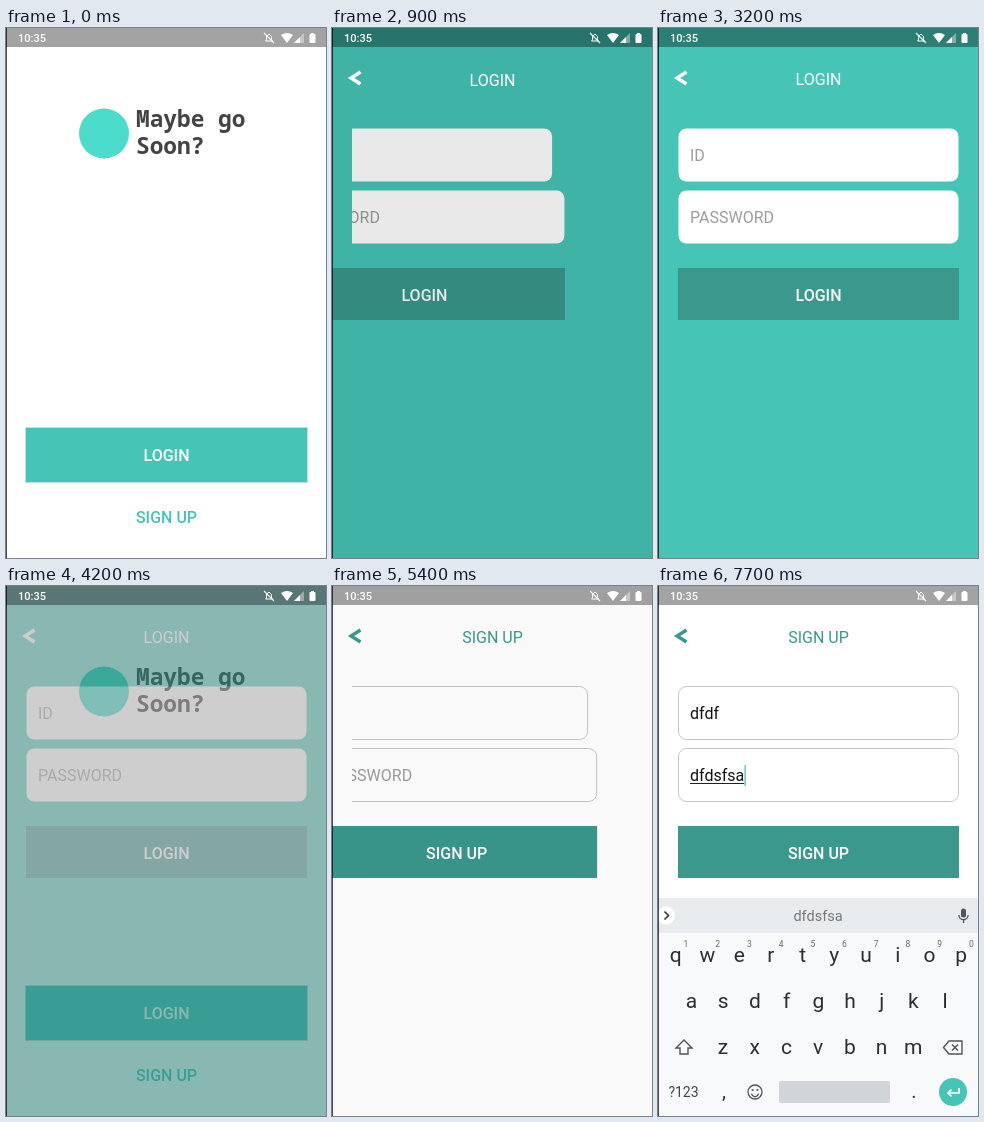
An HTML page with a canvas for the animation above (8 s loop, 320 by 530 pixels).

```html
<!DOCTYPE html>
<html lang="en">
<head>
<meta charset="utf-8">
<title>Login flow</title>
<style>
html, body { margin: 0; width: 100%; height: 100%; overflow: hidden; background: #fff; }
canvas { display: block; width: 100vw; height: 100vh; }
</style>
</head>
<body>
<canvas id="stage"></canvas>
<script>
const W = 320, H = 530, LOOP = 8000;
const TEAL = '#46c4b6', DEEP = '#3a988d', SANS = 'Roboto, sans-serif';
const LOGIN = { title: 'LOGIN', titleFrom: 432.5, bg: TEAL, ink: '#fff' };
const SIGN_UP = { title: 'SIGN UP', titleFrom: 494.5, bg: '#fff', ink: DEEP, border: '#c6c6c6' };
const scale = Math.max(1, window.devicePixelRatio || 1);

function makeContext(canvas) {
  canvas.width = W * scale;
  canvas.height = H * scale;
  const ctx = canvas.getContext('2d');
  ctx.scale(scale, scale);
  return ctx;
}

const screen = makeContext(document.getElementById('stage'));
const layer = makeContext(document.createElement('canvas'));
let g = screen;

const clamp = v => Math.min(1, Math.max(0, v));
const progress = (t, start, length) => clamp((t - start) / length);
const easeOut = u => 1 - (1 - u) ** 2;
const easeInOut = u => u * u * (3 - 2 * u);

function rect(x, y, w, h, color) {
  g.fillStyle = color;
  g.fillRect(x, y, w, h);
}

function box(x, y, w, h, r, fill, stroke) {
  g.beginPath();
  g.roundRect(x, y, w, h, r);
  g.fillStyle = fill;
  g.fill();
  if (stroke) {
    g.strokeStyle = stroke;
    g.lineWidth = 1;
    g.stroke();
  }
}

function disc(x, y, r, color) {
  g.fillStyle = color;
  g.beginPath();
  g.arc(x, y, r, 0, Math.PI * 2);
  g.fill();
}

function trace(points) {
  g.beginPath();
  for (let i = 0; i < points.length; i += 2) g.lineTo(points[i], points[i + 1]);
}

function poly(points, color) {
  trace(points);
  g.fillStyle = color;
  g.fill();
}

function line(points, color, width, closed = false) {
  trace(points);
  if (closed) g.closePath();
  g.strokeStyle = color;
  g.lineWidth = width;
  g.stroke();
}

function text(str, x, y, size, color, align = 'center', weight = 400, family = SANS) {
  g.font = `${weight} ${size}px ${family}`;
  g.textAlign = align;
  g.fillStyle = color;
  g.fillText(str, x, y);
}

function statusBar() {
  rect(0, 0, W, 19, 'rgba(0,0,0,.36)');
  text('10:35', 12, 14, 11, '#fff', 'left', 500);
  // muted bell
  line([259.5, 13, 260.5, 12, 260.5, 8.5, 263, 6, 265.5, 8.5, 265.5, 12, 266.5, 13], '#fff', 1, true);
  line([258, 5, 268, 15], '#fff', 1.1);
  // wifi
  g.beginPath();
  g.moveTo(281, 15);
  g.lineTo(275, 7);
  g.quadraticCurveTo(281, 3, 287, 7);
  g.fillStyle = '#fff';
  g.fill();
  // signal
  poly([288, 15, 298, 15, 298, 5], 'rgba(255,255,255,.4)');
  poly([288, 15, 294, 15, 294, 9], '#fff');
  // battery
  rect(305, 5, 3, 1, '#fff');
  box(303.5, 6, 6, 9, 1, '#fff');
}

function loginButton(hidden) {
  rect(20, 400, 281, 54, TEAL);
  g.strokeStyle = 'rgba(50,150,138,.3)';
  g.lineWidth = 1;
  g.strokeRect(19.5, 399.5, 282, 55);
  if (hidden !== LOGIN.title) text(LOGIN.title, 160.5, LOGIN.titleFrom, 16, '#fff', 'center', 500);
}

// hidden names the label that has left to become a page heading.
function welcome(hidden) {
  rect(0, 0, W, H, '#fff');
  disc(98, 105.5, 25, '#4bdccb');
  const mono = '"Noto Sans Mono", "DejaVu Sans Mono", monospace';
  text('Maybe go', 130, 98.5, 22.8, '#444', 'left', 600, mono);
  text('Soon?', 130, 126, 22.8, '#444', 'left', 600, mono);
  loginButton(hidden);
  if (hidden !== SIGN_UP.title) text(SIGN_UP.title, 160.5, SIGN_UP.titleFrom, 16, TEAL, 'center', 500);
}

function field(y, dx, hint, border, input) {
  g.save();
  g.beginPath();
  g.rect(20, y - 1, 300, 56);
  g.clip();
  box(20.5 + dx, y + .5, 280, 53, 8, '#fff', border);
  if (input && input.value) {
    text(input.value, 32, y + 33, 16, '#111', 'left');
  } else {
    text(hint, 32 + dx, y + 33, 16, '#9d9d9d', 'left');
  }
  if (input && input.focus) {
    g.font = `400 16px ${SANS}`;
    const w = g.measureText(input.value).width;
    if (w) rect(32, y + 35, w, 1, '#222');
    rect(32.3 + w, y + 17, 1.3, 21, TEAL);
  }
  g.restore();
}

// s is the time since the parts began sliding in.
function form(page, s, id, password) {
  const slide = delay => -327 * (1 - easeOut(progress(s, delay, 480)));
  const dx = slide(0);
  rect(0, 0, W, H, page.bg);
  field(100, slide(19), 'ID', page.border, id);
  field(162, dx, 'PASSWORD', page.border, password);
  rect(20 + dx, 240, 281, 52, DEEP);
  text(page.title, 160.5 + dx, 272.5, 16, '#fff', 'center', 500);
}

function heading(page, s) {
  const y = page.titleFrom + (56.5 - page.titleFrom) * easeInOut(progress(s, 0, 270));
  text(page.title, 160.5, y, 16, page.ink);
  g.globalAlpha = progress(s, 30, 200);
  line([28.5, 44, 19, 50, 28.5, 56], page.ink, 3.4);
  g.globalAlpha = 1;
}

function typed(t, steps) {
  let value = '';
  for (const [at, str] of steps) if (t >= at) value = str;
  return value;
}

const idSteps = [[6500, 'd'], [6600, 'df'], [6700, 'dfd'], [6800, 'dfdf']];
const passSteps = [[7200, 'd'], [7500, 'dfd'], [7600, 'dfdsf'], [7700, 'dfdsfsa']];

function signUp(t, s) {
  const id = { value: typed(t, idSteps), focus: t >= 6200 && t < 7100 };
  const password = { value: typed(t, passSteps), focus: t >= 7100 };
  form(SIGN_UP, s, id, password);
  if (t >= 6200) keyboard(218 * (1 - easeOut(progress(t, 6150, 300))), (id.focus ? id : password).value);
}

function keyRow(keys, x, y) {
  [...keys].forEach((k, i) => text(k, x + i * 31.7, y, 21, '#2b2f33'));
}

function keyboard(dy, word) {
  const ink = '#50555a';
  g.save();
  g.translate(0, dy);
  rect(0, 312, W, 218, '#f8f9fa');
  rect(0, 312, W, 35, '#e9ecef');
  disc(8, 329.5, 9, '#fff');
  line([6.5, 325.5, 10.5, 329.5, 6.5, 333.5], '#333', 1.6);
  text(word, 160, 335, 14.5, '#777');
  // microphone
  box(303, 322.5, 5, 9, 2.5, ink);
  g.beginPath();
  g.arc(305.5, 329, 4.6, 0, Math.PI);
  g.strokeStyle = ink;
  g.lineWidth = 1.3;
  g.stroke();
  rect(304.9, 333.5, 1.3, 3.5, ink);

  keyRow('qwertyuiop', 17.8, 376);
  [...'1234567890'].forEach((n, i) => text(n, 28 + i * 31.7, 361, 8.5, '#666'));
  keyRow('asdfghjkl', 33.5, 422);
  keyRow('zxcvbnm', 65, 468);
  // shift and backspace
  line([26, 454, 34, 462, 30, 462, 30, 468, 22, 468, 22, 462, 18, 462], ink, 1.4, true);
  line([285.5, 461.5, 291, 455, 304, 455, 304, 468, 291, 468], ink, 1.4, true);
  line([294, 458.5, 300, 464.5], ink, 1.4);
  line([300, 458.5, 294, 464.5], ink, 1.4);

  text('?123', 25.5, 511, 14, '#444');
  text(',', 66, 512, 20, '#333');
  g.strokeStyle = ink;
  g.lineWidth = 1.3;
  g.beginPath();
  g.arc(97, 506, 7, 0, Math.PI * 2);
  g.stroke();
  g.beginPath();
  g.arc(97, 507, 3.6, .2, Math.PI - .2);
  g.stroke();
  disc(94.6, 504, 1.1, ink);
  disc(99.4, 504, 1.1, ink);
  box(121, 495, 111, 22, 2, '#d1d5da');
  text('.', 256, 512, 20, '#333');
  // enter
  disc(295, 506, 14, TEAL);
  line([301, 502, 301, 507, 290, 507], '#fff', 1.7);
  line([293.5, 503.5, 290, 507, 293.5, 510.5], '#fff', 1.7);
  g.restore();
}

function blend(paint, alpha) {
  g = layer;
  paint();
  g = screen;
  g.globalAlpha = clamp(alpha);
  g.drawImage(layer.canvas, 0, 0, W, H);
  g.globalAlpha = 1;
}

// Both pages fade over black, so the middle of a change is dimmer.
function change(from, to, inAlpha, outAlpha) {
  rect(0, 0, W, H, '#000');
  blend(from, outAlpha);
  blend(to, inAlpha);
}

// The tapped label travels up to the heading while the pages cross.
function enter(page, t, start, paint) {
  const u = progress(t, start, 422), s = t - start - 38;
  if (u <= 0) return welcome();
  if (u < 1) {
    change(() => welcome(page.title), () => paint(s), easeOut(u), 1 - u - u * u);
    g.globalAlpha = clamp(1 - (1.45 * u) ** 3);
    loginButton(page.title);
    g.globalAlpha = 1;
  } else {
    paint(s);
  }
  heading(page, s);
}

function loginDone() {
  form(LOGIN, LOOP);
  heading(LOGIN, LOOP);
}

function draw(t) {
  g = screen;
  if (t < 2000) {
    enter(LOGIN, t, 602, s => form(LOGIN, s));
  } else if (t < 4600) {
    const u = progress(t, 3895, 700);
    if (u > 0) change(loginDone, welcome, u, 1 - .77 * u);
    else loginDone();
  } else {
    enter(SIGN_UP, t, 5042, s => signUp(t, s));
  }
  statusBar();
  rect(0, 0, 1, H, 'rgba(0,0,0,.7)');
}

const begin = performance.now();
function tick() {
  draw((performance.now() - begin) % LOOP);
  requestAnimationFrame(tick);
}
tick();
</script>
</body>
</html>
```
